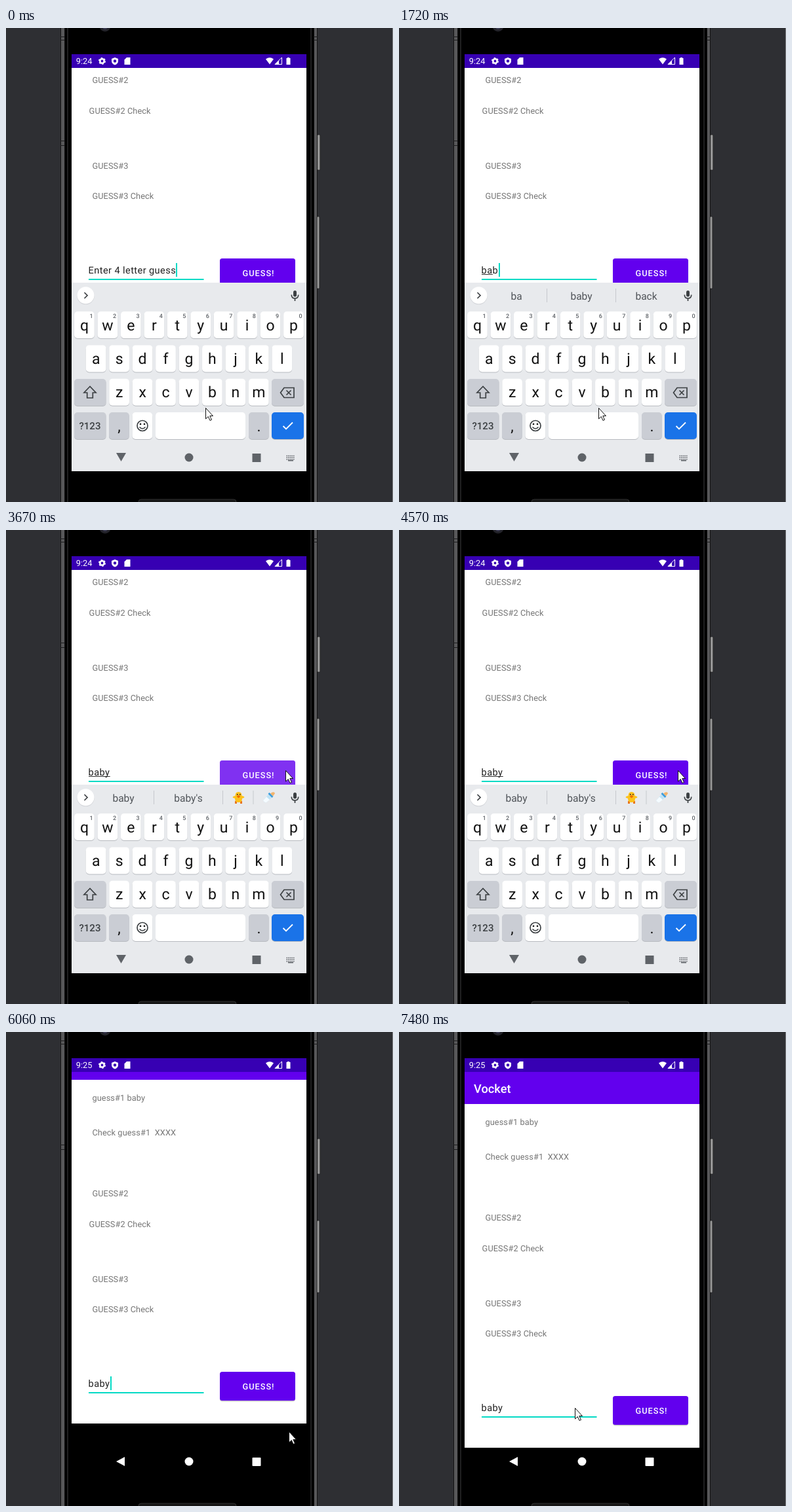
These frames come from a looping animation (590x724 px, 8000 ms). An HTML page:

```html
<!DOCTYPE html>
<html lang="en">
<head>
<meta charset="utf-8">
<title>Word guessing app</title>
<style>
html, body { margin: 0; width: 100%; height: 100%; overflow: hidden; background: #2e2f33; }
svg { display: block; font-family: Roboto, sans-serif; text-rendering: geometricPrecision; }
text { white-space: pre; }
.label { font-size: 12.76px; letter-spacing: .1px; fill: #757575; }
.entry { font-size: 14.58px; letter-spacing: .028em; fill: #212121; }
.mid { text-anchor: middle; }
.word { font-size: 15.5px; fill: #505459; text-anchor: middle; }
.letter { font-size: 23px; fill: #111; text-anchor: middle; }
.digit { font-size: 9px; font-weight: 500; fill: #5f6368; text-anchor: middle; }
.line { fill: none; stroke: #3c4043; stroke-width: 1.7; }
</style>
</head>
<body>
<svg width="590" height="724" viewBox="0 0 590 724">
  <defs>
    <clipPath id="screen"><rect x="100" y="61" width="358" height="616"/></clipPath>
    <linearGradient id="side"><stop stop-color="#666"/><stop offset=".5" stop-color="#a8a8a8"/><stop offset="1" stop-color="#666"/></linearGradient>
  </defs>

  <!-- phone body -->
  <path fill="#2e2f33" d="M0 0H590V724H0Z"/>
  <path fill="#77787b" d="M589 0h1v724h-1z"/>
  <path fill="#111" d="M83 0H475V724H83Z"/>
  <path fill="#58585a" d="M84 0h5v724h-5zM470 0h4v724h-4z"/>
  <path d="M90 0H469V724H90Z"/>
  <path fill="#202021" d="M93 0h2v724h-2zM464 0h2v724h-2z"/>
  <path fill="#1b1b1c" d="M83 13h6v1h-6zM83 18h6v1h-6zM83 172h6v1h-6zM83 179h6v1h-6zM469 13h6v1h-6zM469 18h6v1h-6z"/>
  <rect x="474.500" y="163" width="4.500" height="54" rx="1.500" fill="url(#side)" stroke="#1b1b1c" stroke-width=".6"/>
  <rect x="474" y="288" width="4" height="110" rx="1.500" fill="url(#side)" stroke="#1b1b1c" stroke-width=".6"/>
  <circle cx="151" cy="-3" r="8.500" fill="#23232a"/>
  <circle cx="151" cy="-2" r="4" fill="#3d3d55"/>
  <rect x="202" y="720" width="149" height="10" rx="4" fill="#161616" stroke="#333"/>

  <!-- app page -->
  <g clip-path="url(#screen)">
    <g id="page">
      <path fill="#fff" d="M100 61H458V635H100Z"/>
      <path fill="#6200ee" d="M100 61H458V110H100Z"/>
      <text x="114" y="92.500" font-size="18.230" font-weight="500" fill="#fff">Vocket</text>
      <g class="label">
        <text x="131.400" y="141.500">guess#1 baby</text>
        <text x="131.400" y="194.500">Check guess#1  XXXX</text>
        <text x="131.400" y="287.500">GUESS#2</text>
        <text x="126.600" y="335">GUESS#2 Check</text>
        <text x="131.400" y="419">GUESS#3</text>
        <text x="131.400" y="465">GUESS#3 Check</text>
      </g>
      <text id="entry" class="entry" x="125.600" y="579"></text>
      <rect id="mark" y="580" height="1" fill="#333"/>
      <path fill="#03dac5" d="M126 587h175.500v2H126z"/>
      <rect id="caret" y="563" width="2" height="21" fill="#03dac5"/>
      <rect x="326" y="557" width="115" height="44.500" rx="4" opacity=".2"/>
      <rect x="326" y="556" width="115" height="44" rx="3.500" fill="#6200ee"/>
      <rect id="ripple" x="326" y="556" width="115" height="44" rx="3.500" fill="#fff"/>
      <text x="360.500" y="582.500" font-size="12.760" font-weight="500" letter-spacing="1" fill="#fff">GUESS!</text>
    </g>
  </g>

  <!-- status bar -->
  <path fill="#3700b3" d="M100 40H458V61H100Z"/>
  <text id="clock" x="106.800" y="55.300" font-size="12.760" fill="#fff"></text>
  <g fill="#fff">
    <circle cx="146.500" cy="50.500" r="3.200" fill="none" stroke="#fff" stroke-width="2.600"/>
    <circle cx="146.500" cy="50.500" r="4.700" fill="none" stroke="#fff" stroke-width="1.600" stroke-dasharray="2.460"/>
    <path d="M166 45l5 2v3.500q0 4-5 6q-5-2-5-6V47z"/>
    <circle cx="166" cy="50.500" r="2.200" fill="#3700b3"/>
    <path d="M184 45h5.500v11h-9V48.500z"/>
    <path d="M396 47.500q6-4.500 12 0L402 55.500z"/>
    <path d="M420.500 45v10.500H410z" fill="none" stroke="#fff"/>
    <path d="M416 49.500v6h-6z"/>
    <path d="M429 45h3v1h1.500v10h-6V46h1.500z"/>
  </g>

  <g fill="#fff">
    <path d="M181 649v14l-13-7z"/><circle cx="279" cy="656" r="6.500"/><rect x="375.500" y="650" width="13" height="13" rx="1"/>
  </g>

  <!-- keyboard -->
  <g id="board">
    <path fill="#e8eaed" d="M100 389H458V677H100Z"/>
    <circle cx="121.500" cy="409" r="13.300" fill="#d3d5d9"/>
    <circle cx="121.500" cy="408.300" r="13" fill="#fff"/>
    <path id="chevron" class="line" d="M119.500 404l4.500 4.500l-4.500 4.500"/>
    <g id="hints"></g>
    <rect x="438" y="401" width="5" height="9.500" rx="2.500" fill="#3c4043"/>
    <path class="line" d="M435.300 407.500q0 5.500 5.200 5.500t5.200-5.500M440.500 413v4"/>
    <g id="keys"></g>
    <path class="line" d="M128 547.500l-9 9.500h4.700v8h8.600v-8h4.700z"/>
    <path class="line" d="M424 549.500h15v15h-15l-5.500-7.500zM427.500 553.500l7 7M434.500 553.500l-7 7"/>
    <circle class="line" cx="208" cy="607.500" r="8"/>
    <path class="line" d="M203.500 609.500q4.500 5 9 0"/>
    <circle cx="205" cy="605" r="1.300"/><circle cx="211" cy="605" r="1.300"/>
    <path d="M422.500 608l4.500 4.500l10-10" fill="none" stroke="#fff" stroke-width="1.900"/>
    <g fill="#5f6368">
      <path d="M168 649h15l-7.500 13z"/><circle cx="279" cy="656" r="6.500"/><path d="M375.500 650h13v13h-13z"/>
      <path d="M430 660h8v1.500h-8z"/>
    </g>
    <path fill="none" stroke="#5f6368" stroke-width="1.500" stroke-dasharray="1.600 1" d="M427.500 653.500h13M427.500 656.300h13M427.500 659h13"/>
  </g>

  <path id="mouse" d="M0 0V16.500L3.800 13L6.500 19L9 17.900L6.300 12H11Z" fill="#fff" stroke="#111" stroke-linejoin="round"/>
</svg>
<script>
const $ = id => document.getElementById(id);
const clamp = u => Math.min(1, Math.max(0, u));
const smooth = u => u * u * (3 - 2 * u);
const LOOP = 8000, GREY = '#cacdd4', PITCH = 35.45;

function add(parent, tag, attrs, text) {
  const node = document.createElementNS('http://www.w3.org/2000/svg', tag);
  for (const name in attrs) node.setAttribute(name, attrs[name]);
  if (text) node.textContent = text;
  parent.append(node);
  return node;
}

function key(x, y, width = 30.7, fill = '#fff') {
  const box = { x, width, height: 41, rx: 5 };
  add($('keys'), 'rect', { ...box, y: y + 1, fill: '#b8bbc0' });
  return add($('keys'), 'rect', { ...box, y, fill });
}

['qwertyuiop', 'asdfghjkl', 'zxcvbnm'].forEach((letters, line) => {
  const y = 433 + 51.4 * line;
  [...letters].forEach((letter, i) => {
    const x = 279 - 15.4 + (i - (letters.length - 1) / 2) * PITCH;
    key(x, y);
    add($('keys'), 'text', { class: 'letter', x: x + 15.4, y: y + 28.5 }, letter);
    if (!line) add($('keys'), 'text', { class: 'digit', x: x + 26, y: y + 10.3 }, String((i + 1) % 10));
  });
});
key(104, 536, 48.5, GREY);
key(405, 536, 49, GREY);
key(104, 587, 48.5, GREY);
key(157, 587, 30.7, GREY);
key(192.5, 587);
key(228, 587, 137);
key(370, 587, 30.7, GREY);
const enter = key(405, 587, 49);
add($('keys'), 'text', { class: 'mid', x: 128, y: 612.8, 'font-size': 15, 'font-weight': 500, fill: '#3c4043' }, '?123');
add($('keys'), 'text', { class: 'letter', x: 172.5, y: 616 }, ',');
add($('keys'), 'text', { class: 'letter', x: 385.5, y: 616 }, '.');

// Suggestions for each word being composed
const HINTS = {
  letter: ['letter', 'letters', 'let'],
  4: ['4', '4th', '40'],
  b: ['b', 'be', 'but'],
  ba: ['ba', 'baby', 'back'],
  bab: ['bab', 'baby', 'babe'],
  baby: ['baby', "baby's"]
};
const hintGroups = {};
for (const word in HINTS) {
  const group = hintGroups[word] = add($('hints'), 'g', {});
  const bars = [225, 330];
  HINTS[word].forEach((hint, i) => add(group, 'text', { class: 'word', x: 179 + 99 * i, y: 414.5 }, hint));
  if (HINTS[word].length < 3) {
    bars.push(376.5);
    drawPictures(group);
  }
  bars.forEach(x => add(group, 'rect', { x, y: 398, width: 1, height: 21, fill: '#c6c9ce' }));
}

function drawPictures(group) {
  const path = (d, fill) => add(group, 'path', { d, fill });
  path('M349 414h3v4h-3zM357 414h3v4h-3z', '#e8741e');
  path('M354.500 400q5 0 5 6q5 1 3.500 3l-3 1q0 6-5.500 6t-5.500-6l-3-1q-1.500-2 3.500-3q0-6 5-6z', '#fcc21b');
  path('M351.500 407l3-2l3 2l-3 2.500z', '#ef6c00');
  path('M352 403h1.500v2h-1.500zM356 403h1.500v2h-1.500z', '#4a3426');
  path('M392 413l8-9l5 5l-8 7q-3 1-5-3z', '#bfe3f5');
  path('M394 411l3-3.500l5 4.500l-5 4q-3 1-5-3z', '#f5fbff');
  path('M399.500 403l2-2l6 6l-2 2z', '#3b9ddd');
  path('M403 402.500l3-2l3 0l1 2l-3 4z', '#f2b46d');
}

// The first prompt is erased word by word, then a new word is typed.
// Underline and suggestions trail the typing by one stroke.
const PROMPT = ['Enter', '4', 'letter', 'guess'], ERASED = 650, ERASE_PACE = 177;
const WORD = 'baby', STROKES = [1480, 1600, 1720, 1980, 2260];

function entryAt(t) {
  if (t < ERASED) {
    const left = Math.min(4, Math.ceil((ERASED - t) / ERASE_PACE));
    const composed = left == 2 || left == 3 ? PROMPT[left - 1] : '';
    return { text: PROMPT.slice(0, left).join(' '), composed, toolbar: left == 1 };
  }
  const strokes = STROKES.filter(s => s <= t).length;
  return { text: WORD.slice(0, strokes), composed: WORD.slice(0, Math.max(0, strokes - 1)), toolbar: strokes < 2 };
}

function caretShown(t) {
  const last = Math.max(ERASED, ...STROKES.slice(0, 4).filter(s => s <= t));
  const idle = t - last - 540;
  return idle < 0 || Math.floor(idle / 496) % 2 == 1;
}

// Pointer glides: start, end, x, y
const GLIDES = [
  [2450, 2880, 432, 367], [3290, 3790, 426, 367], [4900, 5450, 432, 610],
  [6500, 6830, 341, 585], [6830, 6980, 372, 575], [6990, 7470, 269, 574]
];
function mouseAt(t) {
  let x = 305, y = 580;
  for (const [start, end, toX, toY] of GLIDES) {
    const u = smooth(clamp((t - start) / (end - start)));
    x += (toX - x) * u;
    y += (toY - y) * u;
  }
  return [Math.round(x) - .5, Math.round(y) + .5];
}

const set = (id, attrs) => { for (const name in attrs) $(id).setAttribute(name, attrs[name]); };

function draw(t) {
  const closed = t >= 6060;
  const { text, composed, toolbar } = entryAt(t);
  const entry = $('entry');
  if (entry.textContent !== text) entry.textContent = text;
  const widthTo = n => n ? entry.getSubStringLength(0, n) : 0;

  const from = text.lastIndexOf(' ') + 1;
  set('mark', {
    x: 126 + widthTo(from),
    width: closed ? 0 : widthTo(from + composed.length) - widthTo(from)
  });
  set('caret', { x: Math.round(126 + widthTo(text.length)), opacity: +caretShown(t) });
  set('ripple', { opacity: .24 * clamp(Math.min((t - 3200) / 300, (4170 - t) / 630)) });

  const shift = closed ? Math.ceil(204 * Math.exp((6000 - t) / 35) - .03) : 204;
  set('page', { transform: `translate(0 ${-shift})` });
  set('board', { visibility: closed ? 'hidden' : 'visible' });
  set('chevron', { transform: toolbar ? 'translate(243 0) scale(-1 1)' : '' });
  for (const word in hintGroups) hintGroups[word].style.display = word === composed ? '' : 'none';
  enter.setAttribute('fill', t >= 5800 ? '#185abc' : '#1a73e8');
  $('clock').textContent = t < 5060 ? '9:24' : '9:25';
  set('mouse', { transform: `translate(${mouseAt(t)})` });
}

let start;
function tick(now) {
  start ??= now;
  draw((now - start) % LOOP);
  requestAnimationFrame(tick);
}
draw(0);
requestAnimationFrame(tick);
</script>
</body>
</html>
```
